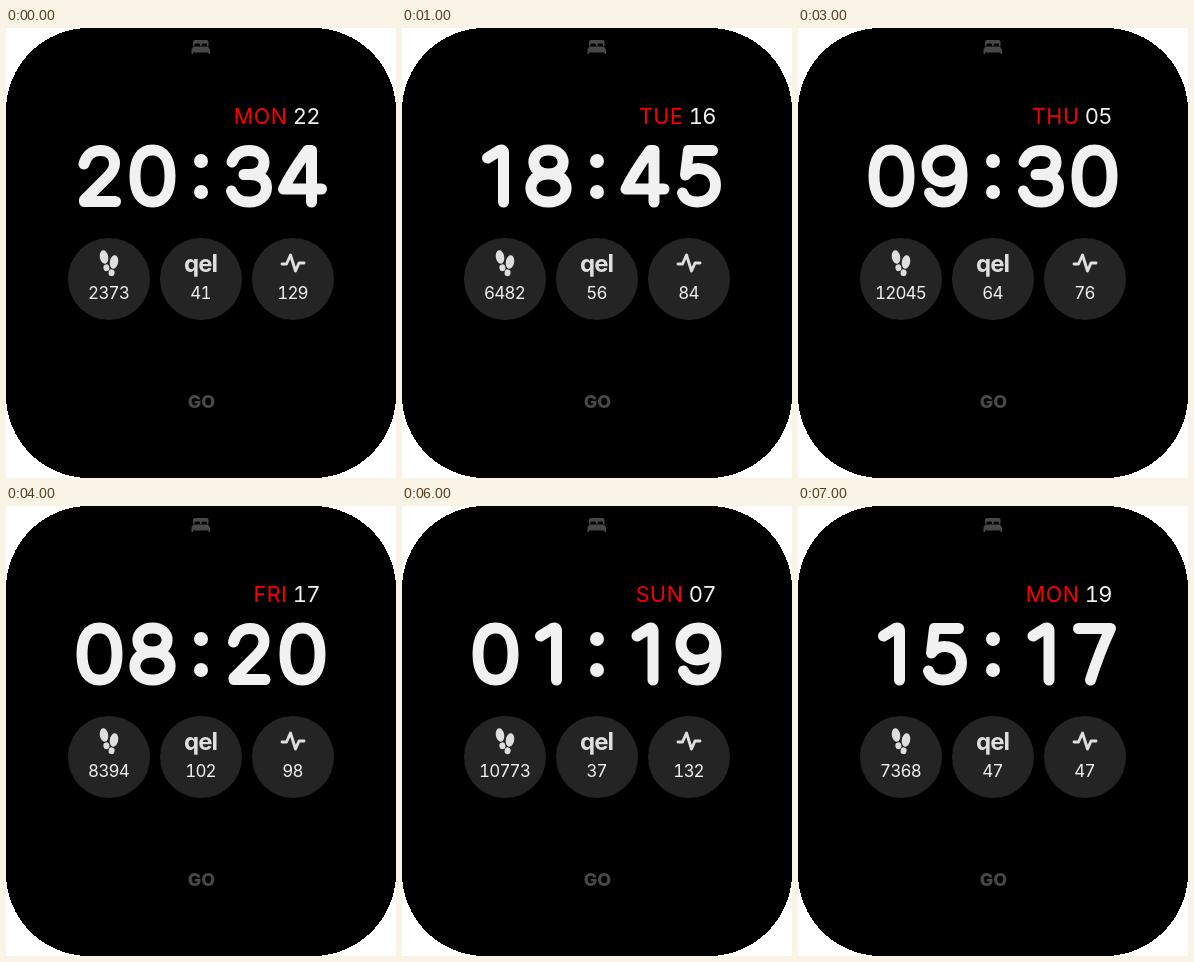
Write an HTML page that moves like this. It is 390x450 px and loops after 8 s.

```html
<!DOCTYPE html>
<html lang="en">
<head>
<meta charset="utf-8">
<title>Watch face</title>
<style>
  html, body { margin: 0; height: 100%; overflow: hidden; background: #fff; }
  svg { display: block; width: 390px; height: 450px; font-family: Inter, sans-serif; font-variant-numeric: tabular-nums; }
  .value { font-size: 17px; font-weight: 400; letter-spacing: -.8px; text-anchor: middle; fill: #f0f0f0; }
  .date { font-size: 22px; text-anchor: end; letter-spacing: -.6px; }
  #day { font-size: 21.5px; letter-spacing: .6px; }
  .line { fill: none; stroke-linecap: round; stroke-linejoin: round; }
</style>
</head>
<body>
<svg viewBox="0 0 390 450">
  <rect width="390" height="450" rx="83" shape-rendering="crispEdges"/>

  <g fill="#484848">
    <path d="M187 18V14Q187 12 189 12H200.500Q202.500 12 202.500 14V18H201V16.500Q201 15.500 200 15.500H196.500Q195.500 15.500 195.500 16.500V18H194V16.500Q194 15.500 193 15.500H189.500Q188.500 15.500 188.500 16.500V18Z"/>
    <path d="M187.500 18.500H202L204 21.500V26H202.500V24.500H187V26H185.500V21.500Z"/>
    <text x="195.500" y="379.500" font-size="18" font-weight="800" text-anchor="middle">GO</text>
  </g>

  <text id="day" class="date" x="281.500" y="96" fill="#f80000"></text>
  <text id="date" class="date" x="314" y="96" fill="#f0f0f0"></text>

  <g class="line" stroke="#f1f1f1" stroke-width="11">
    <path class="digit" transform="translate(93.500)"/>
    <path class="digit" transform="translate(146.500)"/>
    <path class="digit" transform="translate(243)"/>
    <path class="digit" transform="translate(296.500)"/>
  </g>
  <g fill="#f1f1f1">
    <circle cx="195" cy="133" r="7"/>
    <circle cx="195" cy="164" r="7"/>
  </g>

  <g fill="#242424">
    <circle cx="103" cy="251" r="41"/>
    <circle cx="195" cy="251" r="41"/>
    <circle cx="287" cy="251" r="41"/>
  </g>
  <g fill="#dedede">
    <g transform="rotate(-10 98 229)">
      <ellipse cx="98" cy="229" rx="4.200" ry="6.800"/>
      <ellipse cx="98.500" cy="240" rx="3" ry="3.400"/>
    </g>
    <g transform="rotate(10 108 234)">
      <ellipse cx="108" cy="234" rx="4.200" ry="6.800"/>
      <ellipse cx="107.500" cy="245" rx="3" ry="3.400"/>
    </g>
    <text x="194.500" y="243.500" font-size="24" font-weight="700" text-anchor="middle" letter-spacing="-1">qel</text>
  </g>
  <path class="line" d="M276 236H280.500L284.500 227L289.500 243L293 235H298" stroke="#dedede" stroke-width="2.900"/>

  <text class="value" x="102.500" y="271"></text>
  <text class="value" x="194.500" y="271"></text>
  <text class="value" x="286.500" y="271"></text>
</svg>
<script>
const digitPaths = [
  "M-17.500 148C-17.500 131-11 122 0 122S17.500 131 17.500 148S11 174 0 174S-17.500 165-17.500 148Z",
  "M-8 130L4 122.500Q8 121 8 125V174",
  "M-15.500 136C-13 127-7 122.500 1 122.500C10 122.500 15 128 15 135.500C15 141 12 145 8 149L-15 172V173.500H16",
  "M-17 134C-14 126-8 122.500 0 122.500C9 122.500 15 127 15 134.500C15 142 9 146.500 1 146.500H-5M1 146.500C11 146.500 17.500 151 17.500 159.500C17.500 168 10 174 0 174C-9 174-15 170-17.500 163",
  "M9 174V122.500H5C-4 135-13 148-19 161H19",
  "M14 122.500H-10L-13 147C-9 142-5 140.500 0 140.500C10 140.500 17 147 17 157S9 174-1 174C-8 174-14 171-16 165",
  "M15 131C12 125 7 122 1 122C-11 122-17.500 132-17.500 149C-17.500 165-11 174 0 174C10 174 17.500 167 17.500 158S10 142 1 142S-16 148-16 157",
  "M-16 122.500H16Q5 146-4 174",
  "M0 122C19.500 122 19.500 146 0 146S-19.500 122 0 122ZM0 146C23.500 146 23.500 174 0 174S-23.500 146 0 146Z",
  "M-15 165C-12 171-7 174-1 174C11 174 17.500 164 17.500 147C17.500 131 11 122 0 122C-10 122-17.500 129-17.500 138S-10 154-1 154S16 148 16 139"
];

// day, date, time, steps, score, pulse
const readings = [
  "MON 22 2034 2373 41 129",
  "TUE 16 1845 6482 56 84",
  "WED 20 2116 10361 23 48",
  "THU 05 0930 12045 64 76",
  "FRI 17 0820 8394 102 98",
  "SAT 22 2237 8567 38 91",
  "SUN 07 0119 10773 37 132",
  "MON 19 1517 7368 47 47"
].map(row => row.split(" "));

const dayText = document.getElementById("day");
const dateText = document.getElementById("date");
const digits = document.querySelectorAll(".digit");
const valueTexts = document.querySelectorAll(".value");
let shown = -1;

function show(index) {
  const [day, date, time, ...values] = readings[index];
  dayText.textContent = day;
  dateText.textContent = date;
  digits.forEach((digit, i) => digit.setAttribute("d", digitPaths[time[i]]));
  valueTexts.forEach((text, i) => text.textContent = values[i]);
}

function tick() {
  const index = Math.floor(performance.now() / 1000) % readings.length;
  if (index !== shown) show(shown = index);
  requestAnimationFrame(tick);
}
tick();
</script>
</body>
</html>
```
